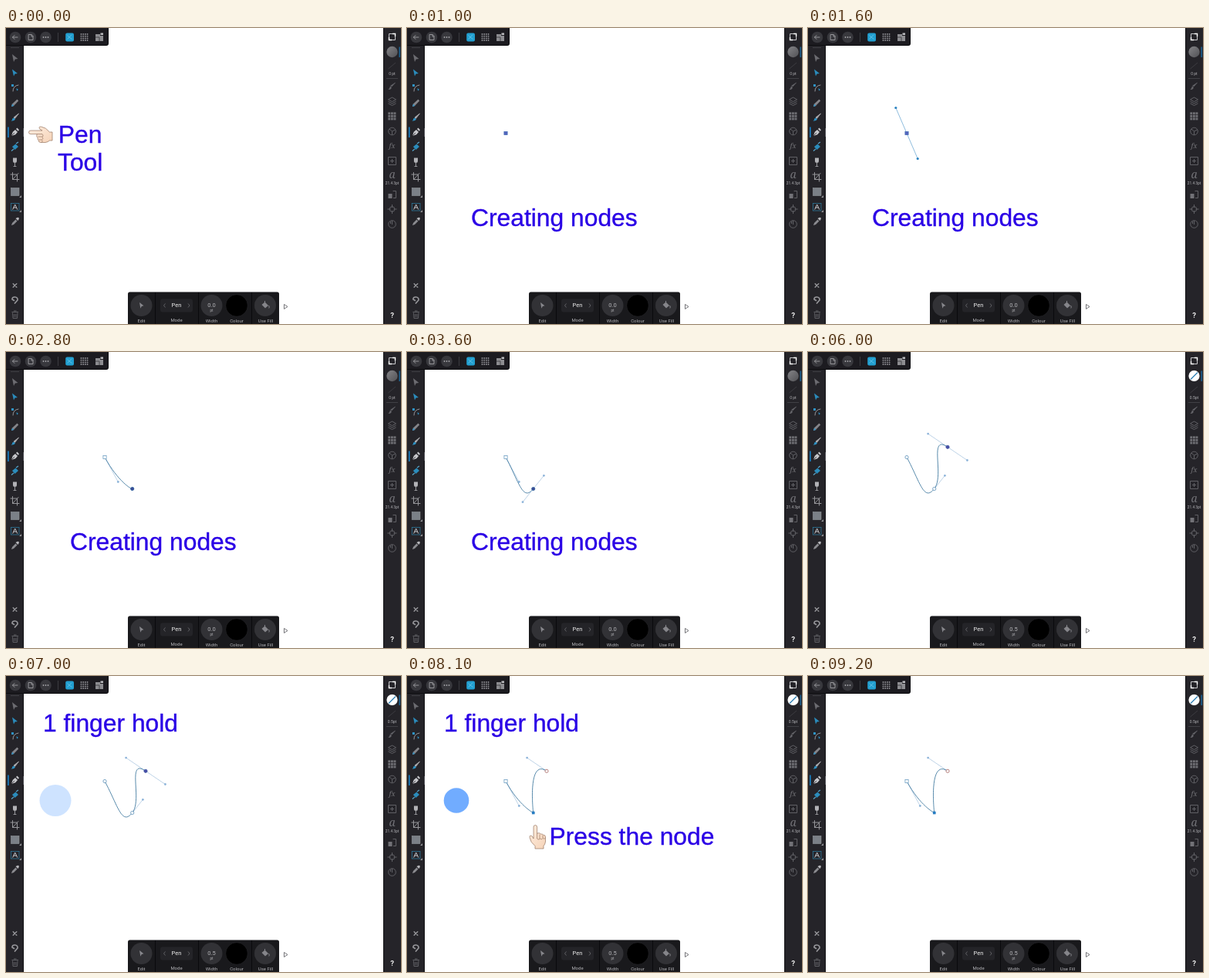
Write an HTML page that moves like this. It is 512 px wide and 384 px high and loops after 9300 ms.

```html
<!DOCTYPE html>
<html lang="en">
<head>
<meta charset="utf-8">
<title>Pen tool</title>
<style>
html, body { margin: 0; width: 100%; height: 100%; overflow: hidden; background: #fff; }
svg { display: block; width: 100vw; height: 100vh; }
.big { font: 31.8px "Liberation Sans", Arial, sans-serif; fill: #2a00e6; stroke: #2a00e6; stroke-width: .35; }
.ui { font-family: Roboto, sans-serif; fill: #b4b4b8; text-anchor: middle; }
.glyph { font-family: "Noto Serif", serif; font-style: italic; fill: #737378; }
.ln { fill: none; stroke: #96969a; stroke-width: 1; stroke-linecap: round; stroke-linejoin: round; }
.dim { fill: none; stroke: #606065; stroke-width: 1; stroke-linejoin: round; }
.handle { fill: none; stroke-width: .7; }
.curve { fill: none; stroke: #3a759c; stroke-width: .85; }
</style>
</head>
<body>
<svg viewBox="0 0 512 384" preserveAspectRatio="none">
  <defs>
    <linearGradient id="ball" x2="1" y2="1"><stop stop-color="#858588"/><stop offset="1" stop-color="#515155"/></linearGradient>
    <linearGradient id="skin" x2="1" y2="1"><stop stop-color="#ffeee0"/><stop offset="1" stop-color="#f5d3b8"/></linearGradient>
    <g id="hand" stroke="#8f6d58" stroke-width=".65" stroke-linejoin="round">
      <path fill="url(#skin)" d="M6 17V3Q6 .5 8.3 .5T10.6 3V11Q14.5 10 15.4 12Q18 11.5 18.6 13.2Q21.5 13 21.5 16V22Q21 25.5 19 27.5V31H8V27.5Q2 23 1 16.5Q.6 14 2.500 14Q4.500 14 6 18Z"/>
      <path fill="none" d="M10.6 11V18Q12 20 14 18.500V12.500M14.500 18Q17 20 18 17.500V13.500M18.300 17.500Q20 19.500 21.300 17"/>
    </g>
  </defs>
  <rect width="512" height="384" fill="#fff"/>

  <g id="art"></g>
  <circle id="pulse" cx="64" cy="161.500" fill="#1a7aff"/>
  <g id="intro">
    <use href="#hand" transform="matrix(0 1 1 0 29 127)"/>
    <text class="big" x="67.800" y="149">Pen</text>
    <text class="big" x="67" y="185">Tool</text>
  </g>
  <text id="making" class="big" x="83" y="256.500">Creating nodes</text>
  <text id="hold" class="big" x="48" y="72">1 finger hold</text>
  <g id="press">
    <use href="#hand" transform="translate(158 193)"/>
    <text class="big" x="184.500" y="219.200">Press the node</text>
  </g>

  <!-- bars -->
  <path d="M0 0H133V20Q133 23 130 23H23V384H0Z" fill="#0c0c0f"/>
  <path d="M0 23H22V384H0Z" fill="#252429"/>
  <path d="M0 0H132V19.500Q132 22 129 22H0Z" fill="#1c1b20"/>
  <rect x="489" width="23" height="384" fill="#0c0c0f"/>
  <rect x="490" width="22" height="384" fill="#252429"/>

  <!-- top -->
  <g fill="#38383d"><circle cx="12" cy="12" r="7.300"/><circle cx="32" cy="12" r="7.300"/><circle cx="51.500" cy="12" r="7.300"/></g>
  <path class="ln" d="M15 12H8.500M11 9.500L8.500 12L11 14.500M29.500 8.500H33L35 10.500V15.500H29.500ZM33 8.500V11H35"/>
  <g fill="#a5a5a9"><circle cx="48.500" cy="12" r=".9"/><circle cx="51.500" cy="12" r=".9"/><circle cx="54.500" cy="12" r=".9"/></g>
  <path d="M67.500 6V18" stroke="#3b3b40"/>
  <rect x="77.200" y="6.500" width="10.800" height="11" rx="2" fill="#229fd0"/>
  <path d="M79.500 14.500L85 8.800M79.500 9.500Q82 12 85.500 14.500" fill="none" stroke="#6cc5e6" stroke-width=".8"/>
  <g id="dots" fill="#8f8f94"></g>
  <path d="M116 8H122V10H126V17H116Z" fill="#8d8d91"/><path d="M122.500 6.500H126V9H122.500Z" fill="#bcbcc0"/><path d="M116 12H121V17" fill="none" stroke="#444449"/>

  <!-- left -->
  <path d="M6 25.500H17" stroke="#404045"/>
  <path d="M8 34L15.500 40L11.800 40.500L10 44Z" fill="#6c6c71"/>
  <path d="M8 53.500L15 59L11.600 59.500L10 62.500Z" fill="#2b8cbc"/>
  <path class="ln" d="M9 82Q9 75 16 74"/><path d="M7 73H10V76H7ZM13.500 78L16 80L14 81.500Z" fill="#2f92c4"/>
  <path d="M7 102L8 98.500L14.500 92.500L16.200 94.500L10 101Z" fill="#85858a"/><path d="M7 102L8 98.500L10.500 101Z" fill="#3a92c0"/>
  <path d="M16.500 111L11.500 117.500L10 116Z" fill="#b3b3b7" stroke="#b3b3b7" stroke-width=".7"/><path d="M10 116.500L12 118.500Q10.500 121 6.500 120.500Q8.500 119.500 8.300 117.500Z" fill="#2f92c4"/>
  <rect x="2" y="128.500" width="1.800" height="13.500" fill="#1a78b8"/><path d="M22.500 130V141" stroke="#45454b"/>
  <path d="M7 140L8.800 134.800L12 132L15 135L12.300 138.200Z" fill="#c8c8cc"/><path d="M13 131L14.500 129.500L17 132.200L15.700 133.700Z" fill="#c8c8cc"/><path d="M7 140L11 136" stroke="#252429" stroke-width=".8"/>
  <path d="M8 154L12.500 150.500L16 154L11.500 158Z" fill="#2b8cbc"/><path d="M13 150L16 148M7 159.500L10 157" stroke="#5aaad0" stroke-width="1.100"/>
  <path d="M9 168.500H14V173Q14 175 11.500 175T9 173Z" fill="#b2b2b6"/><path class="ln" d="M11.500 175V179.500M10 179.500H13"/>
  <path class="ln" d="M8.500 187.500V196.500H17M6 190H14.500V199M8.500 196.500L16 188.500"/>
  <rect x="6.500" y="207.500" width="10.500" height="10" fill="#7b8087" stroke="#93979c" stroke-width=".6"/><path d="M17 220H20V217ZM17 239H20V236Z" fill="#96969a"/>
  <rect x="6.500" y="227.500" width="10.500" height="9.500" fill="none" stroke="#2d7698" stroke-width=".8"/><path class="ln" style="stroke:#c4c4c8" d="M8.800 235.200L11.700 229L14.600 235.200M10 233H13.500"/>
  <path d="M7 256L8 253L12.500 248.500L14.500 250.500L10 255Z" fill="#8b8b90"/><path d="M12.500 247L14.500 246Q17.500 245 16.700 248L15.500 250Z" fill="#b8b8bc"/>
  <path class="ln" style="stroke-width:1.400" d="M9.200 331.700L13.800 336.300M13.800 331.700L9.200 336.300"/>
  <path class="ln" style="stroke-width:1.700" d="M8 352Q8 348.800 11.500 349Q15.500 349.500 15 353L11.500 357M8 352L10.500 353.500"/>
  <path class="dim" d="M8.500 369.500L9 376.500H14.500L15 369.500M7.500 368.500H16M10 367H13.500M10.700 371V375M12.800 371V375"/>

  <!-- right -->
  <path d="M496.500 7.500H504.500V15.500H496.500Z" fill="none" stroke="#c9c9cc"/><path d="M501 7.500H504.500V11M496.500 12V15.500H500" fill="none" stroke="#fff" stroke-width="1.400"/>
  <rect x="509.500" y="24.500" width="1.300" height="13.500" fill="#1a6fa8"/>
  <circle cx="500.500" cy="31" r="7.200" fill="url(#ball)"/>
  <g id="nofill"><circle cx="500.500" cy="31" r="7" fill="#fff"/><path d="M496 35.500L505 26.500" stroke="#2b7fb4" stroke-width="1.200"/></g>
  <path d="M495.500 53L505 45" stroke="#434348" stroke-width=".8"/>
  <text id="side" class="ui" x="500.500" y="61" font-size="5"></text>
  <path d="M493 65.500H508" stroke="#404045"/>
  <path d="M504.500 71L500 76L498.500 75Z" fill="#66666b" stroke="#66666b" stroke-width=".6"/><path d="M498 75.500L500 77.500Q498.500 80.500 495.500 80Q497 79 498 75.500Z" fill="#66666b"/>
  <path class="dim" d="M500.500 90L505.500 92.800L500.500 95.600L495.500 92.800ZM495.500 95.300L500.500 98L505.500 95.300M495.500 97.800L500.500 100.500L505.500 97.800"/>
  <g id="cells" fill="#6f6f74"></g>
  <circle class="dim" cx="500.500" cy="134" r="4.800"/><path class="dim" d="M500.500 134L497 131M500.500 134L504.500 132M500.500 134V138.500"/>
  <text class="ui glyph" x="500.500" y="156" font-size="9">fx</text>
  <path class="dim" d="M495.500 167.500H505.500V177.500H495.500ZM498 172.500H503M500.500 170V175"/>
  <text class="ui glyph" x="500.500" y="195" font-size="14">a</text>
  <text class="ui" x="500.500" y="203" font-size="4.800">21.4 3pt</text>
  <path d="M495.500 215H500.500V221H495.500Z" fill="#727277"/><path class="dim" d="M501.500 211.500H505.500V220.500H502"/>
  <circle class="dim" cx="500.500" cy="235" r="3.300"/><path class="dim" d="M500.500 229V233M500.500 237V241M494.500 235H498.500M502.500 235H506.500"/>
  <circle class="dim" cx="500.500" cy="254.500" r="4.800"/><path class="dim" d="M500.500 250V255M498.500 251V254"/>
  <text class="ui" x="500.500" y="375.500" font-size="9.500" font-weight="700" style="fill:#eee">?</text>

  <!-- bottom -->
  <path d="M158 384V345Q158 342.500 160.500 342.500H351.500Q354 342.500 354 345V384Z" fill="#19191c"/>
  <path d="M193.500 343V384M249.500 343V384M318.500 343V384" stroke="#0a0a0c"/>
  <g fill="#323236"><circle cx="175.500" cy="360" r="14"/><circle cx="266.500" cy="360" r="14"/><circle cx="336" cy="360" r="14"/><rect x="200" y="351.500" width="42" height="17" rx="3" fill="#242428"/></g>
  <circle cx="299" cy="360" r="14.300" fill="#000" stroke="#29292d" stroke-width=".6"/>
  <path d="M173 356L178.500 360.300L175.800 361L174.300 363.800Z" fill="#88888d"/>
  <path class="dim" d="M206.500 357.500L204.500 360L206.500 362.500M236 357.500L238 360L236 362.500"/>
  <path d="M331.500 359L335.500 355.500L340 360L336 363.500Z" fill="#85858a"/><path d="M335.500 356V354M340.500 360Q342 362 340.800 363.500" fill="none" stroke="#85858a"/>
  <g class="ui" font-size="6">
    <text x="221" y="362.300" font-size="7.500" style="fill:#eee">Pen</text>
    <text id="width" x="266.500" y="361.800" font-size="7.500"></text>
    <text x="266.500" y="367.500" font-size="4.500">pt</text>
    <text x="175.500" y="381.500">Edit</text><text x="221" y="381">Mode</text><text x="266.500" y="381.500">Width</text><text x="299" y="381.500">Colour</text><text x="336.500" y="381.500">Use Fill</text>
  </g>
  <path d="M360.500 358.500L365 361.500L360.500 364.500Z" fill="#fff" stroke="#55555a" stroke-width=".8"/>
</svg>
<script>
const LOOP = 9300;
const $ = id => document.getElementById(id);
const show = (id, on) => $(id).setAttribute("visibility", on ? "visible" : "hidden");
const clamp = x => Math.max(0, Math.min(1, x));
const ease = x => x * x * (3 - 2 * x);
const span = (t, a, b) => ease(clamp((t - a) / (b - a)));
const mix = (a, b, k) => a.map((v, i) => v + (b[i] - v) * k);
const off = (p, d, k = 1) => [p[0] + d[0] * k, p[1] + d[1] * k];

const A = [128, 136.5], B = [163.7, 177.5], C = [181, 123.3];

const grid = (x, y, step, n, size, round) => {
  let s = "";
  for (let i = 0; i < n * n; i++)
    s += `<rect x="${x + i % n * step}" y="${y + Math.floor(i / n) * step}" width="${size}" height="${size}" rx="${round}"/>`;
  return s;
};
$("dots").innerHTML = grid(96.500, 7, 2.7, 4, 1.9, .9);
$("cells").innerHTML = grid(495.300, 109.3, 3.6, 3, 2.9, 0);

const line = (p, q, color = "#a3c0dd") => `<path class="handle" stroke="${color}" d="M${p}L${q}"/>`;
const disc = (p, r, fill, stroke = "none") =>
  `<circle cx="${p[0]}" cy="${p[1]}" r="${r}" fill="${fill}" stroke="${stroke}" stroke-width=".8"/>`;
const dot = p => disc(p, 1.4, "#8fb5da");
const arm = (p, q) => line(p, q) + dot(q);
const curve = (p, a, b, q) => `<path class="curve" d="M${p}C${a} ${b} ${q}"/>`;
const square = (p, fill, stroke, r = 2.1) =>
  `<rect x="${p[0] - r}" y="${p[1] - r}" width="${2 * r}" height="${2 * r}" fill="${fill}" stroke="${stroke}" stroke-width=".8"/>`;
const round = (p, fill, stroke) => disc(p, 2.1, fill, stroke);

function drawing(t) {
  if (t < 1000) return "";
  const pullA = span(t, 1000, 1600);
  const dirA = mix([14.2, 33], [17.3, 32], span(t, 1800, 2300));
  const outA = off(A, dirA, pullA);
  if (t < 2700) {
    const inA = off(A, dirA, -pullA);
    return line(inA, outA, "#5d9fce") + disc(inA, 1.6, "#2b83c0") + disc(outA, 1.6, "#2b83c0") +
      square(A, "#5563bd", "#4a72b8");
  }
  const dirB = [13.7, -17.2], pullB = span(t, 2700, 3500);
  const sharp = t >= 7800;
  const inB = sharp ? B : off(B, dirB, -pullB);
  const outB = sharp ? B : off(B, dirB, pullB);
  const first = curve(A, outA, inB, B);
  if (t < 4400)
    return arm(A, outA) + first + line(inB, outB) + dot(inB) + dot(outB) +
      square(A, "#fff", "#6f9fc4") + round(B, "#3d4c96", "#2c5f9c");

  const dirC = mix([23.2, 8.2], [25.4, 17.2], span(t, 5200, 6000));
  const pullC = span(t, 4400, 5200);
  const inC = off(C, dirC, -pullC), outC = off(C, dirC, pullC);
  const both = first + curve(B, outB, inC, C);
  if (sharp)
    return arm(A, outA) + arm(C, inC) + both + square(A, "#fff", "#6f9fc4") +
      square(B, "#2386cf", "#1b6fb5", 1.4) + round(C, "#fff", "#a5625f");
  return arm(B, outB) + line(inC, outC) + dot(inC) + dot(outC) + both +
    round(A, "#fff", "#5c90b8") + round(B, "#fff", "#5c90b8") + round(C, "#4a4da8", "#3b55a0");
}

function render(t) {
  $("art").innerHTML = drawing(t);
  show("intro", t < 900);
  show("making", t >= 900 && t < 6000);
  const holding = t >= 6200 && t < 8700;
  show("hold", holding);
  show("pulse", holding);
  show("press", t >= 7500 && t < 8700);
  const k = .5 + .5 * Math.cos((t - 7000) / 1100 * 3 * Math.PI);
  $("pulse").setAttribute("r", 16.3 + 4.2 * k);
  $("pulse").setAttribute("fill-opacity", .62 - .41 * k);
  const stroked = t >= 4400;
  show("nofill", stroked);
  $("width").textContent = stroked ? "0.5" : "0.0";
  $("side").textContent = stroked ? "0.5pt" : "0 pt";
}

function tick() {
  render(performance.now() % LOOP);
  requestAnimationFrame(tick);
}
tick();
</script>
</body>
</html>
```
